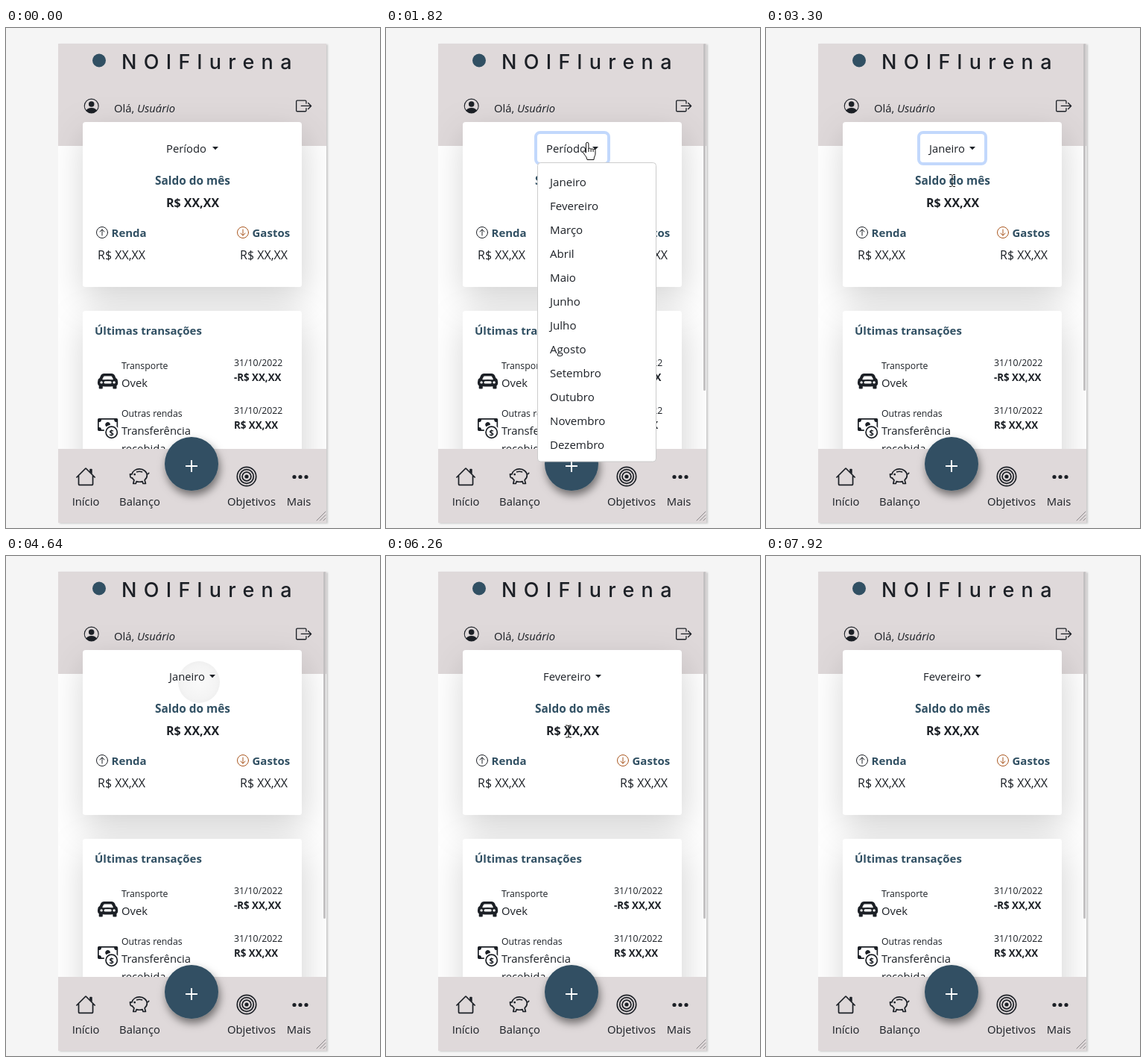
Write an HTML page that moves like this. It is 502 px wide and 670 px high and loops after 8 s.

```html
<!DOCTYPE html>
<html lang="pt">
<head>
<meta charset="utf-8">
<title>Saldo do mês</title>
<style>
  html, body { margin: 0; width: 100%; height: 100%; overflow: hidden; background: #f5f5f5; }
  svg { display: block; font: 14.8px "Open Sans", "Noto Sans", sans-serif; fill: #1c2026; }
  .brand { font: 500 27px Inter, sans-serif; letter-spacing: 9.3px; }
  .head { font-weight: 700; font-size: 15px; fill: #315063; }
  .money { font-size: 16px; }
  .bold { font-weight: 700; }
  .small { font-size: 12.3px; }
  .total { font-size: 13.3px; font-weight: 700; }
  .mid { text-anchor: middle; }
  .line { fill: none; stroke: #1c2026; stroke-linecap: round; stroke-linejoin: round; }
  #menu { font-size: 15.1px; }
</style>
</head>
<body>
<svg width="502" height="670" viewBox="0 0 502 670">
  <defs>
    <clipPath id="screen"><rect x="70" y="21" width="360" height="642"/></clipPath>
    <filter id="cardShadow" x="-50%" y="-50%" width="200%" height="200%">
      <feDropShadow dy="16" stdDeviation="24" flood-opacity=".175"/>
    </filter>
    <filter id="buttonShadow" x="-50%" y="-50%" width="200%" height="200%">
      <feDropShadow dy="6" stdDeviation="6" flood-opacity=".5"/>
    </filter>
    <filter id="phoneShadow"><feDropShadow dy="1" stdDeviation="1.2" flood-opacity=".18"/></filter>
    <radialGradient id="rippleFill">
      <stop offset="0" stop-opacity=".02"/><stop offset=".8" stop-opacity=".045"/><stop offset="1" stop-opacity=".06"/>
    </radialGradient>
  </defs>

  <rect width="502" height="670" fill="#f5f5f5"/>
  <rect x="70" y="21" width="360" height="642" fill="#fff" filter="url(#phoneShadow)"/>

  <g clip-path="url(#screen)">
    <rect x="70" y="21" width="360" height="137" fill="#dfd9da"/>
    <circle cx="125" cy="43.5" r="9" fill="#315063"/>
    <text class="brand" x="155" y="55">NOIFlurena</text>
    <path transform="translate(104.7 94.5) scale(1.25)" fill-rule="evenodd" d="M11 6a3 3 0 1 1-6 0 3 3 0 0 1 6 0zM0 8a8 8 0 1 1 16 0A8 8 0 0 1 0 8zm8-7a7 7 0 0 0-5.468 11.37C3.242 11.226 4.805 10 8 10s4.757 1.225 5.468 2.37A7 7 0 0 0 8 1z"/>
    <text x="145" y="113">Olá, <tspan font-style="italic">Usuário</tspan></text>
    <path class="line" transform="translate(389 93.8) scale(1.33)" d="M10.5 5.5v-2a1 1 0 0 0-1-1h-8a1 1 0 0 0-1 1v9a1 1 0 0 0 1 1h8a1 1 0 0 0 1-1v-2M5.500 8h10M12.500 5l3 3-3 3"/>

    <rect x="103" y="126" width="294" height="221" rx="4" fill="#fff" filter="url(#cardShadow)"/>
    <rect x="103" y="379" width="294" height="260" rx="4" fill="#fff" filter="url(#cardShadow)"/>

    <text class="head mid" x="250.5" y="210" style="font-size:15.4px">Saldo do mês</text>
    <text class="money bold mid" x="250.5" y="240">R$ XX,XX</text>
    <g class="line"><circle cx="129" cy="274" r="7.500"/><path d="M129 278v-8m-3 3 3-3 3 3"/></g>
    <text class="head" x="141.5" y="280">Renda</text>
    <text class="money" x="123" y="310">R$ XX,XX</text>
    <g class="line" style="stroke:#a9561e"><circle cx="318" cy="274" r="7.500"/><path d="M318 270v8m-3-3 3 3 3-3"/></g>
    <text class="head" x="330.5" y="280">Gastos</text>
    <text class="money" x="314" y="310">R$ XX,XX</text>

    <text class="head" x="119" y="411">Últimas transações</text>
    <g transform="translate(123 459.6) scale(1.7)">
      <path d="M2.5 3.5A2.5 2.5 0 0 1 4.8 2h6.4a2.5 2.5 0 0 1 2.3 1.5l.8 1.9.4.4q.8.4 1 1.2l.3 1.7v.9q0 1.3-1 2v1.9a.5.5 0 0 1-.5.5h-2a.5.5 0 0 1-.5-.5v-1.3q-4 .2-8 0v1.3a.5.5 0 0 1-.5.5h-2a.5.5 0 0 1-.5-.5v-1.900q-1-.7-1-2v-.9L.3 7q.2-.8 1-1.200l.4-.4z"/>
      <g fill="#fff">
        <path d="M5.300 4h5.400l.5.3 1 1.900q.1.700-.5.700-3.700-.3-7.400 0-.6 0-.5-.7l1-1.900z"/>
        <circle cx="3" cy="9" r="1"/><circle cx="13" cy="9" r="1"/><rect x="5" y="8" width="6" height="2" rx="1"/>
      </g>
    </g>
    <text class="small" x="155" y="457">Transporte</text>
    <text x="155" y="481">Ovek</text>
    <text class="small" x="306" y="453">31/10/2022</text>
    <text class="total" x="306" y="473">-R$ XX,XX</text>

    <g transform="translate(123 523) scale(1.7)">
      <path d="M1 0a1 1 0 0 0-1 1v8a1 1 0 0 0 1 1h4.083q.1-.5.258-1H3a2 2 0 0 0-2-2V3a2 2 0 0 0 2-2h10a2 2 0 0 0 2 2v3.528q.6.5 1 1.154V1a1 1 0 0 0-1-1zM9.998 5.083 10 5a2 2 0 1 0-3.132 1.650 6 6 0 0 1 3.130-1.567z"/>
      <circle class="line" cx="11" cy="11" r="4.500"/>
    </g>
    <text class="mid bold" x="141.7" y="545.7" style="font-size:11px">$</text>
    <text class="small" x="155" y="521">Outras rendas</text>
    <text x="155" y="545">Transferência</text>
    <text x="155" y="569">recebida</text>
    <text class="small" x="306" y="517">31/10/2022</text>
    <text class="total" x="306" y="537">R$ XX,XX</text>

    <rect x="70" y="564" width="360" height="99" fill="#dfd9da"/>
    <g transform="translate(93.2 587.3) scale(1.73)">
      <path class="line" d="M1 8.500 7.650 1.850q.35-.3.7 0L15 8.500M2.500 7.500v6a1 1 0 0 0 1 1h9a1 1 0 0 0 1-1v-6"/>
      <path d="M13 2.500V6l-2-2V2.500a.5.5 0 0 1 .5-.5h1a.5.5 0 0 1 .5.5z"/>
    </g>
    <g transform="translate(165.5 587.5) scale(1.7)">
      <path class="line" d="M2.050 6.150C2.700 3.700 5.100 2.030 7.960 2.030c3.400 0 6.040 2.300 6.040 5.040 0 1.400-.7 2.700-1.850 3.630l.760 2.830h-2l-.6-1.700a7.300 7.300 0 0 1-4.600 0l-.6 1.700h-2l.680-2.800A5.200 5.200 0 0 1 2.400 9.030h-.560a1 1 0 0 1-1-.830L.6 6.150zM6 4.270a7 7 0 0 1 4 0M14 6.200q1.300-.3 1.400-1"/>
      <circle cx="4.250" cy="6.250" r=".750"/>
    </g>
    <g class="line" stroke-width="1.7">
      <circle cx="323" cy="601" r="12.700"/><circle cx="323" cy="601" r="9.300"/><circle cx="323" cy="601" r="5.900"/>
    </g>
    <circle cx="323" cy="601" r="2.600"/>
    <circle cx="387" cy="601.5" r="2.600"/><circle cx="395" cy="601.5" r="2.600"/><circle cx="403" cy="601.5" r="2.600"/>
    <g class="mid">
      <text x="107" y="640">Início</text><text x="179.5" y="640">Balanço</text>
      <text x="329.5" y="640">Objetivos</text><text x="393" y="640">Mais</text>
    </g>
    <circle cx="249" cy="584" r="36" fill="#315063" filter="url(#buttonShadow)"/>
    <path d="M241 587h16M249 579v16" stroke="#fff" stroke-width="2"/>
    <path class="line" style="stroke:#8b8789" d="M417 660l12-12M421.500 660l7.500-7.500M426 660l3-3"/>
    <rect id="scrollbar" x="426" y="21" width="3" height="465" rx="1.5" fill="#c3c1c2"/>

    <rect id="ring" y="140" height="42" rx="6" fill="#fff" stroke="#c2d8fc" stroke-width="4"/>
    <text id="label" y="167"></text>
    <path id="caret" d="M0 159h8l-4 4.300z"/>
    <g id="menu">
      <rect x="-.5" y="180.5" width="159" height="400.5" rx="4" fill="#fff" stroke="#ccc"/>
    </g>
  </g>

  <circle id="ripple" r="28" fill="url(#rippleFill)"/>
  <circle id="press" cx="270" cy="153" r="12" fill="#ffff80" style="mix-blend-mode:multiply"/>
  <g id="cursor" fill="#fff" stroke="#111" stroke-linejoin="round">
    <path id="arrow" d="M0 0v17l4-3.800 2.600 6 2.600-1.100-2.600-5.900h5.500z"/>
    <path id="hand" d="M-1.500 14V2a1.700 1.700 0 0 1 3.400 0v7a1.700 1.700 0 0 1 3.200.6 1.600 1.600 0 0 1 3 .8 1.500 1.500 0 0 1 2.900 1V16c0 2-2 3.500-2 7.500H0C0 20-4 17-5.500 13.500c-.6-1.800 1.500-2.200 2.400-1zM1.900 9v4M5.100 9.600V13M8.100 10.400V13"/>
    <path id="beam" fill="none" d="M-4-8h3l1 1 1-1h3M0-7V7M-4 8h3l1-1 1 1h3"/>
  </g>
</svg>
<script>
const LOOP = 8000;
const $ = id => document.getElementById(id);
const months = "Janeiro Fevereiro Março Abril Maio Junho Julho Agosto Setembro Outubro Novembro Dezembro".split(" ");
$("menu").insertAdjacentHTML("beforeend",
  months.map((name, i) => `<text x="16" y="${212 + 32 * i}">${name}</text>`).join(""));

// [time, x, y]
const path = [
  [350, 445, 641], [870, 270, 153], [2080, 270, 153], [2700, 250, 205],
  [3820, 250, 204], [4080, 236, 190], [4400, 264, 157], [4550, 259, 169],
  [4760, 259, 169], [5250, 242, 235], [6200, 242, 235], [6260, 245, 235],
  [6620, 224, 360], [7060, 256, 505], [7120, 256, 505], [7520, 253, 563],
];
// [time, x, y]
const clicks = [[1420, 270, 153], [2970, 250, 205], [4640, 259, 169], [5530, 242, 235]];
const RIPPLE = 120;

const within = (t, ...spans) => spans.some(([from, to]) => t >= from && t < to);
const show = (id, on) => $(id).style.display = on ? "" : "none";
const move = (id, x, y = 0) => $(id).setAttribute("transform", `translate(${x} ${y})`);

function pointAt(t) {
  const next = path.findIndex(key => key[0] > t);
  if (next < 1) return path.at(next).slice(1);
  const [t0, x0, y0] = path[next - 1], [t1, x1, y1] = path[next];
  const k = (t - t0) / (t1 - t0), e = k * k * (3 - 2 * k);
  return [x0 + (x1 - x0) * e, y0 + (y1 - y0) * e];
}

function cursorKind(x, y, open) {
  const onButton = Math.abs(x - 250) < 46 && y > 142 && y < 180;
  const onItem = open && x > 205 && x < 365 && y > 190 && y < 575;
  if (onButton || onItem || Math.hypot(x - 249, y - 584) < 36) return "hand";
  const onText = Math.abs(x - 250) < 50 && (Math.abs(y - 204) < 11 || Math.abs(y - 235) < 12);
  return onText ? "beam" : "arrow";
}

function draw(t) {
  const [label, half] = t < 3100 ? ["Período", 47] : t < 5700 ? ["Janeiro", 43] : ["Fevereiro", 51];
  const open = within(t, [1560, 3100], [4820, 5700]);
  $("label").textContent = label;
  $("label").setAttribute("x", 262 - half);
  move("caret", 230 + half);
  $("ring").setAttribute("x", 248 - half);
  $("ring").setAttribute("width", 2 * half + 4);
  move("menu", 251 - half);
  show("ring", within(t, [1500, 3460], [4760, 5880]));
  show("menu", open);
  show("scrollbar", t >= 1560);
  show("press", within(t, [1210, 1420]));

  const click = clicks.find(([start]) => within(t, [start, start + RIPPLE]));
  show("ripple", click);
  if (click) {
    move("ripple", click[1], click[2]);
    $("ripple").style.opacity = (1 - (t - click[0]) / RIPPLE) ** 2;
  }

  const [x, y] = pointAt(t), kind = cursorKind(x, y, open);
  show("cursor", !click && within(t, [350, 7920]));
  move("cursor", x, y);
  for (const name of ["arrow", "hand", "beam"]) show(name, name === kind);
}

const start = performance.now();
function tick() {
  draw((performance.now() - start) % LOOP);
  requestAnimationFrame(tick);
}
tick();
</script>
</body>
</html>
```
